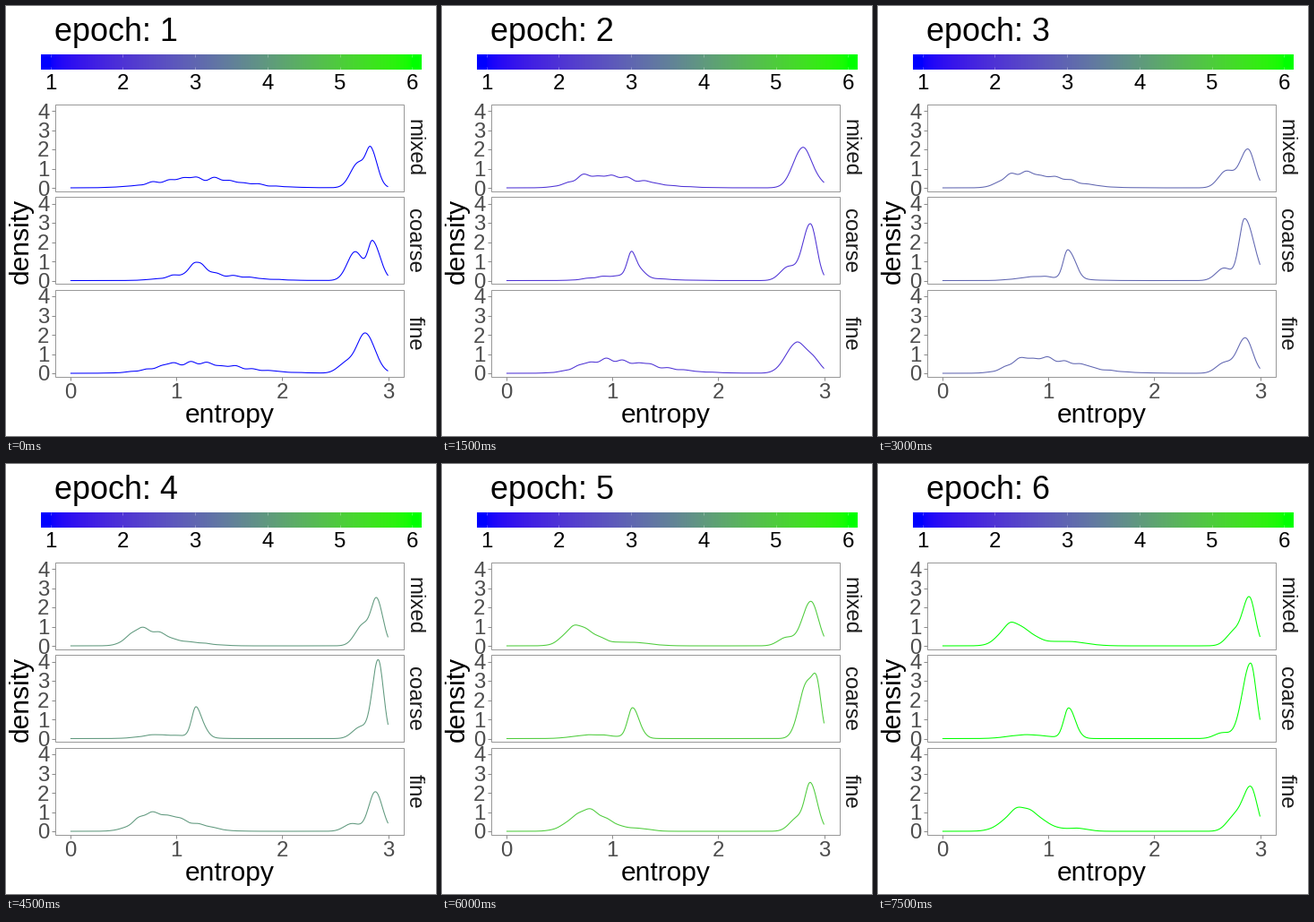
These frames come from a looping animation (480 px wide and 480 px high, 9000 ms). A matplotlib script:

```python
import numpy as np
import matplotlib.pyplot as plt
from matplotlib.animation import FuncAnimation
from matplotlib.patches import Rectangle

SIZE, DPI = 480, 96
PT = 72 / DPI                      # points per pixel
EPOCHS = 6
X0, DX, DY = 71.9, 118.2, 21.5     # entropy origin, pixels per unit
GAP = 103.5                        # distance between panels
BOX_LEFT, BOX_RIGHT, BOX_TOP, BOX_HEIGHT = 54.5, 443.5, 109.5, 97
ZERO = 203                         # baseline of the first panel
BAR_LEFT, BAR_RIGHT, BAR_TOP, BAR_BOTTOM = 39, 464, 54, 71
FIRST, STEP = 49.6, 80.75          # bar position of epoch 1, gap between epochs

plt.rcParams["font.family"] = "Liberation Sans"
grid = np.linspace(0, 3, 512)
rng = np.random.default_rng(4)


def shade(t):
    """Blue to green through a muted violet and teal."""
    t = np.asarray(t, float)
    red = 195 * np.sqrt(t * (1 - t))
    blue = 255 * (1 - t) + 27 * np.sin(np.pi * t) ** 2
    return np.stack([red, 255 * t, np.minimum(blue, 255)], axis=-1) / 255


def bump(center, height, left, right=None):
    """Gaussian with its own width on each side."""
    width = np.where(grid < center, left, right or left)
    return height * np.exp(-0.5 * ((grid - center) / width) ** 2)


def ripple(i):
    """Sampling wiggle that calms down with training."""
    waves = sum(np.sin(f * grid + rng.uniform(0, 2 * np.pi)) for f in (19, 31, 43))
    return 1 + 0.08 * (1 - i / EPOCHS) * waves


def switch(i, middle, speed):
    return 1 / (1 + np.exp(speed * (i - middle)))


def mixed_hump(i):
    fade = np.exp(-1.3 * i)
    return (bump(0.66 + 0.5 * fade, 0.52 + 0.135 * i, 0.11 + 0.22 * fade,
                 0.16 + 0.26 * switch(i, 2.5, 3)) + bump(1.18, 0.045 * i, 0.17))


def coarse_hump(i):
    spike = bump(1.19, 1.52 - 0.8 * np.exp(-1.1 * i), 0.045, 0.065)
    return spike + bump(0.77 + 0.4 * np.exp(-0.6 * i), 0.2 + 0.18 * np.exp(-1.5 * i),
                        0.16 + 0.06 * np.exp(-i), 0.15 + 0.25 * np.exp(-0.3 * i))


def fine_hump(i):
    fade = np.exp(-0.8 * i)
    return (bump(0.74 + 0.35 * fade, 0.55 + 0.14 * i, 0.14 + 0.13 * fade,
                 0.17 + 0.3 * switch(i, 2.8, 2)) + bump(1.27, 0.03 * i, 0.1))


# Right-hand mode per epoch: center, height, left and right width,
# then center and height of its shoulder.
mixed_peak = [(2.84, 1.76, .045, .061, 2.72, 1.3), (2.795, 2.0, .09, .075, 2.92, .4),
              (2.885, 2.0, .073, .063, 2.68, .87), (2.895, 2.25, .05, .058, 2.765, 1.1),
              (2.875, 2.31, .08, .071, 2.64, .42), (2.9, 2.42, .06, .055, 2.76, .75)]
coarse_peak = [(2.855, 1.95, .044, .072, 2.69, 1.5), (2.87, 2.94, .072, .06, 2.66, .7),
               (2.855, 3.2, .053, .088, 2.66, .65), (2.907, 4.05, .055, .05, 2.74, .6),
               (2.935, 1.85, .04, .04, 2.84, 2.9), (2.91, 3.92, .078, .054, 2.645, .3)]
fine_peak = [(2.785, 2.07, .08, .09, 2.6, .5), (2.735, 1.5, .1, .075, 2.885, .8),
             (2.86, 1.83, .075, .07, 2.66, .53), (2.88, 2.05, .063, .067, 2.66, .4),
             (2.873, 2.35, .05, .065, 2.75, .7), (2.912, 2.24, .07, .06, 2.76, .75)]


def density(hump, peak, i):
    center, height, left, right, side, side_height = peak[i]
    return (hump(i) * ripple(i) + bump(center, height, left, right)
            + bump(side, side_height, 0.075))


PANELS = {"mixed": (mixed_hump, mixed_peak),
          "coarse": (coarse_hump, coarse_peak),
          "fine": (fine_hump, fine_peak)}
curves = {name: [density(*parts, i) for i in range(EPOCHS)]
          for name, parts in PANELS.items()}

fig = plt.figure(figsize=(SIZE / DPI, SIZE / DPI), dpi=DPI, facecolor="white")
ax = fig.add_axes([0, 0, 1, 1])
ax.axis("off")


def label(x, y, text, px=24, color="black", ha="center", angle=0):
    return ax.text(x, y, text, fontsize=px * PT, color=color, ha=ha, va="baseline",
                   rotation=angle, rotation_mode="anchor")


def stroke(xs, ys, color, width=1):
    return ax.plot(xs, ys, color=color, lw=width * PT, solid_capstyle="butt")[0]


# colour bar
bar_x = np.arange(BAR_LEFT, BAR_RIGHT) + 0.5
ramp = shade(np.clip((bar_x - FIRST) / (STEP * (EPOCHS - 1)), 0, 1))
ax.imshow(ramp[None], extent=[BAR_LEFT, BAR_RIGHT, BAR_BOTTOM, BAR_TOP], aspect="auto")
for n in range(EPOCHS):
    x = FIRST + n * STEP
    for y in (BAR_TOP, BAR_BOTTOM - 3.4):
        stroke([x, x], [y, y + 3.4], (1, 1, 1, 0.5), 0.6)
    label(x, 92.8, str(n + 1))

# panels
lines = {}
zeros = {}
for k, name in enumerate(PANELS):
    top, zero = BOX_TOP + k * GAP, ZERO + k * GAP
    ax.add_patch(Rectangle((BOX_LEFT, top), BOX_RIGHT - BOX_LEFT, BOX_HEIGHT,
                           fill=False, ec="#999999", lw=PT))
    for d in range(5):
        y = zero - d * DY
        stroke([BOX_LEFT - 4, BOX_LEFT], [y, y], "#8c8c8c")
        label(48.5, y + 8.5, str(d), color="#4d4d4d", ha="right")
    label(449.5, top + BOX_HEIGHT / 2 + 0.5, name, color="#1a1a1a", angle=-90)
    zeros[name] = zero
    lines[name] = stroke(X0 + grid * DX, zero - 0 * grid, "blue", 1.05)

bottom = BOX_TOP + 2 * GAP + BOX_HEIGHT
for n in range(4):
    x = X0 + n * DX
    stroke([x, x], [bottom, bottom + 4], "#8c8c8c")
    label(x, 437.5, str(n), color="#4d4d4d")

label(249.2, 465, "entropy", 30)
label(24.5, 262, "density", 30, angle=90)
title = label(53.5, 39, "", 36, ha="left")

ax.set_xlim(0, SIZE)
ax.set_ylim(SIZE, 0)


def draw(i):
    title.set_text(f"epoch: {i + 1}")
    color = tuple(shade(i / (EPOCHS - 1)))
    for name, line in lines.items():
        line.set_ydata(zeros[name] - DY * curves[name][i])
        line.set_color(color)
    return [title, *lines.values()]


anim = FuncAnimation(fig, draw, frames=EPOCHS, interval=1500, repeat=True)
plt.show()
```
